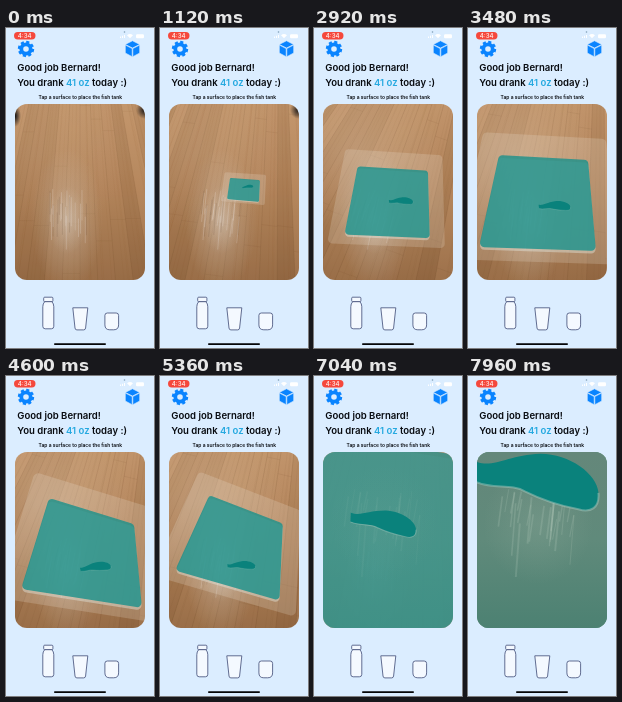
These frames come from a looping animation (148x320 px, 8 s). An HTML page with a canvas:

```html
<!DOCTYPE html>
<html lang="en">
<head>
<meta charset="utf-8">
<title>Fish tank water tracker</title>
<style>
  html, body { margin: 0; width: 100%; height: 100%; overflow: hidden; background: #dbedff; }
  canvas, svg { position: absolute; left: 0; top: 0; width: 148px; height: 320px; }
  text { font-family: Inter, "Liberation Sans", sans-serif; font-weight: 600; }
</style>
</head>
<body>
<canvas id="camera"></canvas>
<svg viewBox="0 0 148 320">
  <rect x="8" y="4" width="21.5" height="7.4" rx="3.7" fill="#f5483c"/>
  <text x="18.7" y="9.9" font-size="6.1" text-anchor="middle" fill="#ffe4df">4:34</text>
  <circle cx="118.5" cy="4" r=".8" fill="#7d9bb4"/>
  <g fill="#fff">
    <path d="M114 10V8.5h1V10zM116 10V7.7h1V10zM118 10V6.9h1V10z"/>
    <path d="M121 7.2Q124 4.8 127 7.2L124 10.2Z"/>
    <rect x="130" y="6.2" width="8" height="4" rx="1.2"/>
  </g>

  <g fill="none" stroke="#0a84ff">
    <circle cx="20" cy="21" r="4.7" stroke-width="3.8"/>
    <circle cx="20" cy="21" r="7" stroke-width="2.4" stroke-dasharray="3.1 2.398"/>
  </g>
  <g stroke="#dbedff" stroke-width=".6" stroke-linejoin="round">
    <path d="M126.500 12.800L133.700 16.400L126.500 20L119.300 16.400Z" fill="#0a84ff"/>
    <path d="M119.300 17L126.200 20.600V28.700L119.300 25Z" fill="#0a84ff"/>
    <path d="M133.700 17L126.800 20.600V28.700L133.700 25Z" fill="#0a84ff"/>
  </g>

  <g font-size="9.55" fill="#080b10">
    <text x="11.3" y="42.9">Good job Bernard!</text>
    <text x="11.3" y="58.3">You drank <tspan fill="#26a9e0">41 oz</tspan> today :)</text>
  </g>
  <text x="74.300" y="71" font-size="4.95" text-anchor="middle" fill="#080b10">Tap a surface to place the fish tank</text>

  <g fill="#f4f9ff" stroke="#48547e" stroke-width=".85" stroke-linejoin="round">
    <rect x="37.700" y="269.200" width="9.200" height="4.500" rx="1"/>
    <path d="M38.700 273.700h7.200q1.900 2 1.900 5v19.600q0 2.500-2.400 2.500h-6.200q-2.400 0-2.400-2.500v-19.600q0-3 1.900-5Z"/>
    <path d="M66.800 279.800h15l-2.200 20.200q-.2 1.900-1.900 1.900h-6.800q-1.700 0-1.900-1.900Z"/>
    <path d="M101.300 285h8.900q2.400 0 2.400 2.400v9.500q0 4.900-4.900 4.900h-3.900q-4.900 0-4.900-4.900v-9.500q0-2.400 2.400-2.400Z"/>
  </g>
  <rect x="48" y="315.200" width="52" height="1.700" rx=".85" fill="#050607"/>
</svg>
<script>
const LOOP = 8000, TANK_PLACED = 720;
const canvas = document.getElementById("camera");
const ctx = canvas.getContext("2d");
const ratio = Math.max(1, window.devicePixelRatio || 1);
canvas.width = 148 * ratio;
canvas.height = 320 * ratio;

// time, floor angle, four tank corners, fish x, y, length, angle
const poses = [
  [0,    0,   73,147, 98,149, 97,168, 70,166,  86,157, 9,  -.2],
  [1120, .13, 70,150, 100,152, 99,174, 67,171, 88,159, 11, -.25],
  [2360, .5,  59,149, 108,155, 104,196, 52,191, 88,169, 16, -.15],
  [3480, .16, 31,127, 120,132, 128,223, 11,219, 87,179, 32, -.13],
  [4600, .25, 43,122, 128,148, 136,232, 15,213, 90,192, 31, -.25],
  [6160, .18, 49,109, 122,136, 108,223, 9,186,  72,181, 31, .02],
  [7000, .1,  16,62,  158,86,  156,270, -24,252, 70,150, 65, .04],
  [7960, 0,  -80,-40, 240,-40, 240,340, -80,340, 70,108, 126, 0]
];

const clamp = v => Math.max(0, Math.min(1, v));
const ramp = (t, from, to) => { const u = clamp((t - from) / (to - from)); return u * u * (3 - 2 * u); };
const noise = n => { const v = Math.sin(n * 127.1 + 11.7) * 43758.5453; return v - Math.floor(v); };

function poseAt(time) {
  let i = 0;
  while (i < poses.length - 2 && time >= poses[i + 1][0]) i++;
  const a = poses[i], b = poses[i + 1], span = b[0] - a[0];
  const u = clamp((time - a[0]) / span);
  const before = poses[Math.max(0, i - 1)], after = poses[Math.min(poses.length - 1, i + 2)];
  return a.map((v, k) => {
    const m0 = (b[k] - before[k]) / (b[0] - before[0]) * span;
    const m1 = (after[k] - v) / (after[0] - a[0]) * span;
    const u2 = u * u, u3 = u2 * u;
    return (2 * u3 - 3 * u2 + 1) * v + (u3 - 2 * u2 + u) * m0 + (3 * u2 - 2 * u3) * b[k] + (u3 - u2) * m1;
  });
}

function line(x0, y0, x1, y1, color, width) {
  ctx.strokeStyle = color;
  ctx.lineWidth = width;
  ctx.beginPath();
  ctx.moveTo(x0, y0);
  ctx.lineTo(x1, y1);
  ctx.stroke();
}

function polygon(points, radius = 0) {
  const n = points.length, last = points[n - 1], first = points[0];
  ctx.beginPath();
  ctx.moveTo((last[0] + first[0]) / 2, (last[1] + first[1]) / 2);
  points.forEach((p, i) => ctx.arcTo(...p, ...points[(i + 1) % n], radius));
  ctx.closePath();
}

function glow(x, y, rx, ry, color) {
  ctx.save();
  ctx.translate(x, y);
  ctx.scale(rx, ry);
  const g = ctx.createRadialGradient(0, 0, 0, 0, 0, 1);
  g.addColorStop(0, `rgba(${color})`);
  g.addColorStop(1, `rgba(${color.replace(/,[^,]+$/, ",0")})`);
  ctx.fillStyle = g;
  ctx.fillRect(-1, -1, 2, 2);
  ctx.restore();
}

function drawFloor(time, angle) {
  const light = ctx.createLinearGradient(0, 76, 0, 252);
  light.addColorStop(0, "#c0946a");
  light.addColorStop(.5, "#b08258");
  light.addColorStop(1, "#966b45");
  ctx.fillStyle = light;
  ctx.fillRect(9, 76, 130, 176);

  ctx.save();
  ctx.translate(74, 164);
  ctx.rotate(angle);
  ctx.scale(1 + time * 4e-5, 1 + time * 4e-5);
  for (let i = -14; i < 14; i++) {
    const xAt = (edge, y) => edge * 14 * (1 + y / 330);
    const tone = noise(i);
    ctx.fillStyle = tone > .5 ? `rgba(220,175,130,${(tone - .5) * .2})` : `rgba(85,50,22,${(.5 - tone) * .18})`;
    polygon([[xAt(i, -190), -190], [xAt(i + 1, -190), -190], [xAt(i + 1, 190), 190], [xAt(i, 190), 190]]);
    ctx.fill();
    line(xAt(i, -190), -190, xAt(i, 190), 190, "rgba(90,55,28,.16)", .6);
    for (let j = 0; j < 3; j++) {
      const y = -150 + j * 110 + noise(i * 7 + j) * 90;
      line(xAt(i, y), y, xAt(i + 1, y), y, "rgba(90,55,28,.12)", .5);
      const edge = i + .2 + noise(i * 3 + j) * .6;
      line(xAt(edge, -190), -190, xAt(edge, 190), 190, "rgba(110,70,36,.08)", .6);
    }
  }
  ctx.restore();

  // warm haze spreads over the boards as the camera comes closer
  glow(45, 125, 80, 80, `220,195,172,${.1 + .2 * ramp(time, 300, 3000)}`);
  const glossX = 61, glossY = 192;
  glow(glossX, glossY, 36, 72, "215,210,202,.36");
  glow(glossX, glossY, 20, 34, "235,234,230,.24");
  for (let i = 0; i < 24; i++) {
    const x = glossX - 20 + noise(i + 40) * 40, y = glossY - 32 + noise(i + 60) * 34;
    const color = i % 3 ? "rgba(242,240,236,.22)" : "rgba(95,72,52,.18)";
    line(x, y, x - angle * 20, y + 14 + noise(i + 80) * 22, color, .9);
  }
  glow(9 - 10 * ramp(time, 0, 1100), 88, 6, 11, "15,15,18,1");
  glow(139 + 12 * ramp(time, 1100, 2200), 82, 9, 9, "15,15,18,1");
}

function drawFish(x, y, length, angle, time) {
  ctx.save();
  ctx.translate(x, y);
  ctx.rotate(angle);
  ctx.scale(length, length * (.74 + .26 * ramp(time, 6400, 7800)));
  ctx.beginPath();
  ctx.moveTo(-.5, -.18);
  ctx.bezierCurveTo(-.35, -.12, -.25, -.23, .02, -.24);
  ctx.bezierCurveTo(.25, -.24, .47, -.08, .48, .07);
  const underside = () => {
    ctx.bezierCurveTo(.49, .19, .42, .23, .32, .2);
    ctx.bezierCurveTo(.16, .17, .02, .12, -.1, .06);
    ctx.bezierCurveTo(-.22, -.01, -.36, .05, -.5, -.02);
  };
  underside();
  ctx.closePath();
  ctx.fillStyle = "#0a827c";
  ctx.fill();
  ctx.beginPath();
  ctx.moveTo(.48, .07);
  underside();
  ctx.lineWidth = .016;
  ctx.strokeStyle = "rgba(165,200,188,.5)";
  ctx.stroke();
  ctx.restore();
}

function drawTank(pose) {
  const corners = [2, 4, 6, 8].map(k => [pose[k], pose[k + 1]]);
  const cx = corners.reduce((s, p) => s + p[0], 0) / 4;
  const cy = corners.reduce((s, p) => s + p[1], 0) / 4;
  const size = Math.hypot(corners[1][0] - corners[0][0], corners[1][1] - corners[0][1]);
  const grow = (s, dy = 0) => corners.map(([x, y]) => [cx + (x - cx) * s, cy + (y - cy) * s + dy]);

  polygon(grow(1.38, -size * .05), size * .06);
  ctx.fillStyle = "rgba(232,222,208,.22)";
  ctx.fill();

  // pale bottom rim peeks out below the water
  ctx.save();
  polygon(grow(1, size * .03), size * .05);
  ctx.fillStyle = "rgba(225,226,218,.45)";
  ctx.fill();
  polygon(corners, size * .05);
  ctx.fillStyle = "rgba(30,146,140,.82)";
  ctx.fill();
  ctx.restore();
}

function drawUnderwater(time) {
  const depth = ramp(time, 6700, 7650);
  if (!depth) return;
  ctx.globalAlpha = depth;
  const water = ctx.createLinearGradient(0, 76, 0, 252);
  water.addColorStop(0, "#64877a");
  water.addColorStop(.5, "#608a7b");
  water.addColorStop(1, "#4c8172");
  ctx.fillStyle = water;
  ctx.fillRect(9, 76, 130, 176);
  glow(70, 148, 55, 60, "160,182,166,.24");
  for (let i = 0; i < 24; i++) {
    const x = 27 + noise(i + 5) * 80, y = 110 + noise(i + 25) * 38;
    line(x, y, x - 4, y + 18 + noise(i + 45) * 36, "rgba(190,208,192,.2)", .8 + noise(i) * 1.2);
  }
  ctx.globalAlpha = 1;
}

function draw(time) {
  const pose = poseAt(time);
  ctx.setTransform(ratio, 0, 0, ratio, 0, 0);
  ctx.clearRect(0, 0, 148, 320);
  ctx.save();
  polygon([[9, 76], [139, 76], [139, 252], [9, 252]], 12);
  ctx.clip();
  drawFloor(time, pose[1]);
  if (time >= TANK_PLACED) {
    drawTank(pose);
    drawUnderwater(time);
    drawFish(...pose.slice(10), time);
  }
  ctx.restore();
}

function tick() {
  draw(performance.now() % LOOP);
  requestAnimationFrame(tick);
}
tick();
</script>
</body>
</html>
```
